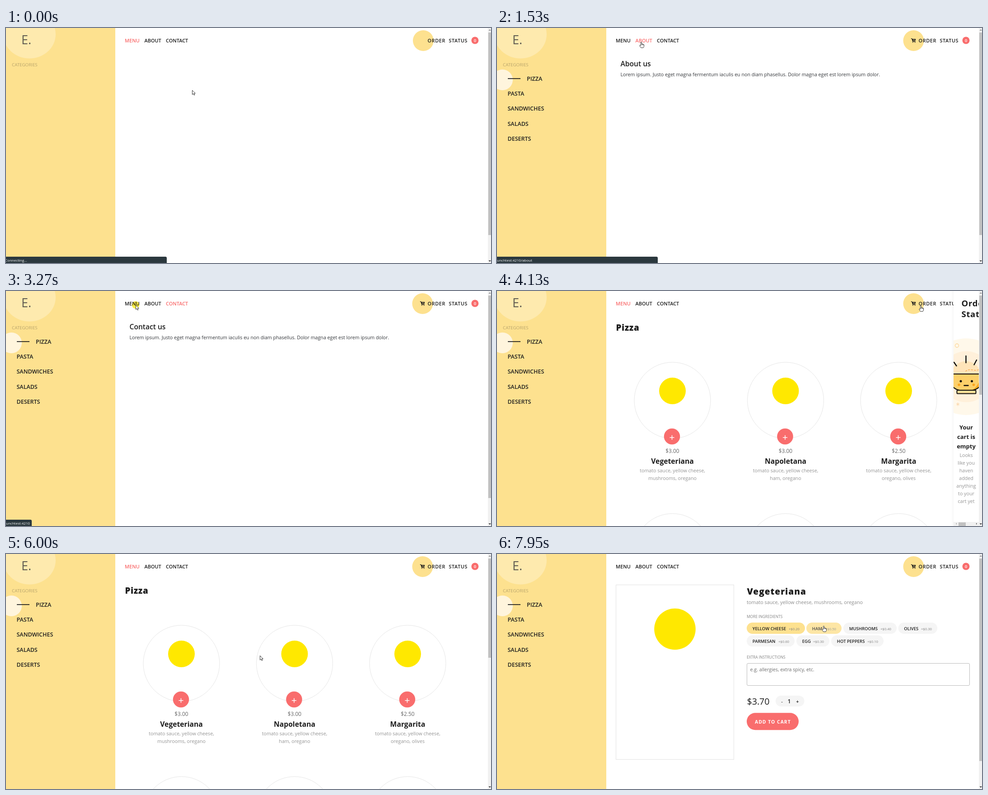
These frames come from a looping animation (1074 px wide and 521 px high, 8000 ms). An HTML page:

```html
<!DOCTYPE html>
<html lang="en">
<head>
<meta charset="utf-8">
<title>Food order</title>
<style>
html, body { margin: 0; width: 100%; height: 100%; overflow: hidden; background: #fff; }
body, text { font-family: "Open Sans", "Noto Sans", sans-serif; }
#stage { position: relative; width: 1074px; height: 521px; overflow: hidden; }
#stage > svg { position: absolute; left: 0; top: 0; display: block; }
text { white-space: pre; }
#drawer { position: absolute; right: 7px; top: 0; height: 521px; overflow: hidden; background: #fff;
  box-shadow: -1px 0 6px rgba(0,0,0,.06); color: #1d1d1d; }
.head { display: flex; justify-content: space-between; padding: 15px 17.5px 0; margin-bottom: 42px; }
.head h2 { margin: 0; font-size: 18.5px; line-height: 24px; font-weight: 700; letter-spacing: .7px; }
.hide { flex: none; position: relative; top: 2.5px; display: flex; align-items: center; height: 24px;
  font-size: 10.8px; font-weight: 500; letter-spacing: .9px; }
.hide svg { margin-left: 7px; }
.art { display: block; position: relative; left: 50%; margin-left: -85px; }
.note { padding: 17px 7.2% 0; text-align: center; }
.note b { display: block; font-size: 13px; line-height: 21.2px; font-weight: 700; }
.note span { display: block; font-size: 10.7px; line-height: 17px; color: #959595; }
#hbar { position: absolute; left: 0; right: 0; bottom: 0; height: 9px; background: #f1f1f1; }
#hbar i { position: absolute; left: 11px; top: 1px; width: 16px; height: 8px; background: #c1c1c1; }
#hbar::before, #hbar::after { content: ""; position: absolute; top: 2px; border: 2.5px solid transparent; }
#hbar::before { left: 3px; border-right-color: #a0a0a0; }
#hbar::after { right: 2px; border-left-color: #505050; }
</style>
</head>
<body>
<div id="stage">
  <svg id="page" width="1074" height="521"></svg>
  <div id="drawer">
    <div class="head">
      <h2>Order Status</h2>
      <div class="hide">HIDE<svg width="15" height="8" fill="none" stroke="#1d1d1d"><path d="M0 4H14M11 1.5L14 4L11 6.5"/></svg></div>
    </div>
    <svg class="art" id="art" width="170" height="170" viewBox="859.5 81 170 170"></svg>
    <div class="note"><b>Your cart is empty</b><span>Looks like you haven added anything to your cart yet</span></div>
    <div id="hbar"><i></i></div>
  </div>
  <svg id="top" width="1074" height="521"></svg>
</div>
<script>
const LOOP = 8000, INK = '#1d1d1d', RED = '#f96d6d', SUN = '#fde18f', GREY = '#959595', LOGO = '#ffe800';
const SEMI = 'font-weight="600"', BOLD = 'font-weight="700"', BLACK = 'font-weight="800"';
const $ = id => document.getElementById(id);

const text = (x, y, size, str, attrs = '') => `<text x="${x}" y="${y}" font-size="${size}" fill="${INK}" ${attrs}>${str}</text>`;
const dot = (x, y, r, fill, attrs = '') => `<circle cx="${x}" cy="${y}" r="${r}" fill="${fill}" ${attrs}/>`;
const box = (x, y, w, h, r, fill, attrs = '') => `<rect x="${x}" y="${y}" width="${w}" height="${h}" rx="${r}" fill="${fill}" ${attrs}/>`;
const path = (d, attrs) => `<path d="${d}" ${attrs}/>`;
const group = (id, body) => `<g id="${id}">${body}</g>`;
const tint = c => `style="fill:${c}"`;
const mid = c => `text-anchor="middle" ${tint(c)}`;

function sidebar() {
  const items = ['PASTA', 'SANDWICHES', 'SALADS', 'DESERTS'];
  return box(0, 0, 242, 521, 0, SUN) +
    '<ellipse cx="52" cy="14" rx="58" ry="53.5" fill="#fff" opacity=".28"/>' +
    text(34, 36, 27, 'E.', tint('#5f5b51') + ' font-weight="500"') +
    text(13, 85, 9.75, 'CATEGORIES', tint('#b8a46c')) +
    group('cats', dot(12, 115, 23, '#fff5dd') + box(24, 111.3, 28, 1.8, 0, INK) +
      text(66, 117.3, 12.5, 'PIZZA', SEMI) +
      items.map((s, i) => text(23.5, 150.1 + i * 33.25, 12.5, s, SEMI)).join(''));
}

function navbar() {
  const link = (id, x, s) => text(x, 32, 10.9, s, `id="${id}" ${SEMI}`);
  const cart = path('M916.8 23.6h2.2l1.6 6h6', `fill="none" stroke="${INK}" stroke-width="1.1"`) +
    path('M919.2 24.2h8.2l-1.2 4.4h-6z', `fill="${INK}"`) +
    path('M923.3 25v2.8M921.9 26.4h2.8', `stroke="${SUN}" stroke-width=".8"`) +
    dot(921, 31.4, 1, INK) + dot(925.6, 31.4, 1, INK);
  return link('menu', 263, 'MENU') + link('about', 306.5, 'ABOUT') + link('contact', 354, 'CONTACT') +
    dot(922.5, 28, 23, SUN, 'id="sun"') + group('cart', cart) +
    text(933.5, 32, 10.9, 'ORDER', 'letter-spacing=".6" ' + SEMI) +
    text(980.5, 32, 10.9, 'STATUS', 'letter-spacing=".6" ' + SEMI) +
    dot(1038.5, 27.5, 8, RED) + text(1038.5, 30.8, 9, '0', mid('#fff') + SEMI);
}

function products() {
  const list = [
    [388.5, '$3.00', 'Vegeteriana', 'mushrooms, oregano'],
    [639, '$3.00', 'Napoletana', 'ham, oregano'],
    [889.5, '$2.50', 'Margarita', 'oregano, olives']
  ];
  return list.map(([x, price, name, rest], i) => {
    const ring = y => dot(x, y, 84.5, 'none', 'stroke="#e6e6e6"');
    const add = dot(x - 1, 322.5, 17.8, RED) + path(`M${x - 6} 324.7h10M${x - 1} 319.7v10`, 'stroke="#fff" stroke-width="1.5"');
    return ring(242.5) + ring(578) + dot(x, 221.5, 29.5, LOGO, 'class="pic"') + group('add' + i, add) +
      text(x, 358.5, 11.9, price, mid('#666')) +
      text(x, 382.5, 15.7, name, mid(INK) + BOLD) +
      text(x, 402, 10.7, 'tomato sauce, yellow cheese,', mid(GREY)) +
      text(x, 419, 10.7, rest, mid(GREY));
  }).join('');
}

function infoPage() {
  return text(273.5, 85, 15.6, '', 'id="infoTitle" ' + SEMI) +
    text(273.5, 107, 10.67, 'Lorem ipsum. Justo eget magna fermentum iaculis eu non diam phasellus. Dolor magna eget est lorem ipsum dolor.', tint('#33363a'));
}

function detail() {
  const chips = [
    [553, 129, 0, 'YELLOW CHEESE', '20'], [685, 78, 0, 'HAM', '50'], [767, 118, 0, 'MUSHROOMS', '40'], [888.5, 86.5, 0, 'OLIVES', '30'],
    [553, 106, 1, 'PARMESAN', '60'], [663, 73, 1, 'EGG', '30'], [740, 116, 1, 'HOT PEPPERS', '10']
  ];
  const chip = ([x, w, row, name, cents], i) => {
    const y = 152 + row * 28.3;
    return group('chip' + i, box(x, y, w, 25, 12.5, '#f5f5f5') + text(x + 12.8, y + 16.8, 9.5, name, SEMI) +
      text(x + w - 12, y + 16.5, 7.7, '+$0.' + cents, 'text-anchor="end" ' + tint('#808080')));
  };
  return box(263.5, 68.5, 261, 387, 0, '#fff', 'stroke="#e2e2e2"') + dot(394, 166.5, 45.8, LOGO) +
    text(553.5, 90, 19.1, 'Vegeteriana', 'letter-spacing="1" ' + BLACK) +
    text(553, 110.8, 10.8, 'tomato sauce, yellow cheese, mushrooms, oregano', tint('#8c8c8c') + ' font-weight="500"') +
    text(553, 142, 8.4, 'MORE INGREDIENTS', tint('#828282')) + chips.map(chip).join('') +
    text(553, 232, 8.4, 'EXTRA INSTRUCTIONS', tint('#828282')) +
    box(553.5, 242.5, 493, 49, 2.5, '#fff', 'stroke="#bababa"') +
    text(560.5, 260, 10.67, 'e.g. allergies, extra spicy, etc.', tint('#6c6c6c')) +
    text(553.5, 334, 19.6, '', 'id="price"') +
    box(617, 314, 63.5, 24, 12, '#f5f5f5') + text(631, 331, 11, '-', mid(INK)) +
    text(647, 331.3, 12.5, '1', mid(INK) + SEMI) + text(665.3, 331, 11, '+', mid(INK) + SEMI) +
    box(553, 352.3, 115, 38, 19, RED) +
    text(571, 375.8, 10.4, 'ADD TO CART', tint('#fff') + 'letter-spacing="1" ' + BOLD);
}

function emptyBowl() {
  const line = (d, w = 2.4) => path(d, `fill="none" stroke="#0c0c0c" stroke-width="${w}" stroke-linecap="round"`);
  const plus = (x, y) => path(`M${x - 4.5} ${y}h9M${x} ${y - 4.5}v9`, 'stroke="#fbc45a" stroke-width="1.6"');
  const star = (x, y) => path(`M${x} ${y - 4}v8M${x - 3.5} ${y - 2}l7 4M${x - 3.5} ${y + 2}l7 -4`, 'stroke="#fbd2a4"');
  const ring = (x, y) => dot(x, y, 4, 'none', 'stroke="#fcd69a" stroke-width="1.3"');
  const bowl = 'M904 160H985C985 180 973 194 958 196H930C916 194 904 180 904 160Z';
  return dot(944.5, 166, 85, '#fff8ea') + dot(944.5, 166, 56.5, '#fff0da') + dot(944, 164.5, 33, '#fee4b9') +
    ring(924, 97) + ring(879, 173) + ring(1001, 173) +
    plus(980, 94) + plus(898, 144) + plus(997, 225) + star(1014, 141) + star(926, 227) +
    path(bowl, 'fill="#fcd06a"') +
    path('M976 160H985C985 180 973 193 959 195C971 186 976 174 976 160Z', 'fill="#fbaa1f"') +
    line(bowl, 2) +
    box(924, 196, 42, 7.5, 1, '#fddf98', 'stroke="#0c0c0c" stroke-width="2"') +
    line('M944 120V135M917.5 134L923 142M967.5 129L962 139.5') +
    path('M943 154Q949 149 959 151T976 149Q979 145 977 142', 'fill="none" stroke="#fba94a" stroke-width="1.5" stroke-dasharray="4 2.5"') +
    line('M978.5 135l6 6M979 139.5l5.5 -4M982 134.5l3 1M980 138l2 3', 1.4) + dot(982, 138, 2.3, '#222') +
    dot(932.5, 176, 2.5, '#0c0c0c') + dot(957, 176, 2.5, '#0c0c0c') +
    dot(928.5, 184, 2.8, '#fba41c') + dot(961, 184, 2.8, '#fba41c') + line('M940 185.5H949');
}

function overlay() {
  const outline = 'fill="#fff" stroke="#222" stroke-width=".9" stroke-linejoin="round"';
  return box(1067, 0, 7, 521, 0, '#f1f1f1') + box(1068, 10, 6, 449, 0, '#c1c1c1', 'id="thumb"') +
    path('M1068.5 6l2.7-3.5L1074 6z', 'fill="#a0a0a0"') + path('M1068.5 515l2.7 3.5L1074 515z', 'fill="#505050"') +
    group('status', box(-5, 507, 361, 18, 3, '#2b383e', 'id="bar"') + text(-2, 517.5, 8, '', `id="barText" ${tint('#fff')}`)) +
    group('pointer', dot(0, 0, 8.3, '#fff04a', 'id="glow" style="mix-blend-mode:multiply"') +
      group('arrow', path('M.5 .5V10L2.8 8L4.4 11.4L5.9 10.8L4.4 7.4H7.3Z', outline)) +
      group('hand', path('M-.6 7.5V1.2Q.5 -.2 1.6 1.2V5Q3 4.2 3.6 5.3Q5 4.9 5.3 6Q6.4 5.8 6.5 7V10Q6 12 5 13.3H-.2Q-2.6 10.4 -3.2 8.2Q-2.6 6.4 -.6 8.4ZM1.6 5V7.3M3.6 5.3V7.4M5.3 6V7.6', outline)) +
      group('beam', path('M-3 -6H-.7L0 -5.2L.7 -6H3M0 -5.2V5.2M-3 6H-.7L0 5.2L.7 6H3', 'fill="none" stroke="#333"')));
}

$('page').innerHTML = sidebar() + navbar() +
  text(263.5, 88.3, 18.8, 'Pizza', 'id="homeTitle" letter-spacing=".6" ' + BLACK) +
  group('home', products()) + group('info', infoPage()) + group('detail', detail());
$('art').innerHTML = emptyBowl();
$('top').innerHTML = overlay();

// Timed states: [ms, ...values]
const HOST = 'lunchtest:4210';
const views = [[0, 'blank'], [140, 'title'], [280, 'home'], [1530, 'about'], [1990, 'contact'], [3410, 'home'], [6740, 'detail']];
const bars = [
  [0, 'Connecting...', 356, 1], [340, 'Connecting...', 356, .6], [410, 'Connecting...', 356, .3], [480, '', 0, 0],
  [1270, HOST + '/about', 82, 1], [1530, HOST + '/about', 356, 1],
  [1800, HOST + '/contact', 87, 1], [2070, HOST + '/contact', 356, 1],
  [2800, HOST, 57, 1], [3410, HOST, 356, 1], [3730, HOST, 356, .5], [3800, '', 0, 0]
];
const drawer = [[0, 0], [4060, 8], [4130, 56], [4200, 172], [4270, 247], [5600, 239], [5670, 160], [5740, 50], [5800, 0]];
const clicks = [[1340, 1530], [1800, 1990], [3140, 3410], [3860, 4060], [5410, 5600], [6520, 6740], [7210, 7480], [7770, 7950]];

// Pointer, in ticks of 1/15 s: [tick, x, y, easing into this point]
const smooth = u => u * u * (3 - 2 * u), slowIn = u => u ** 1.5, slowOut = u => 1 - (1 - u) ** 1.6;
const track = [
  [0, 412, 137.5], [11, 412, 137.5], [19, 319, 30.5], [25, 319, 30.5], [27, 374, 28], [36, 374, 28], [43, 287, 31],
  [53, 287, 31], [58, 938, 32], [68, 938, 32], [72, 960, 297], [73, 965, 274], [77, 1016, 31], [84, 1016, 31],
  [90, 562, 225, slowIn], [94, 385, 321, slowOut], [105, 385, 321], [108, 650, 164], [111, 650, 164], [116, 723, 159]
];
const shapes = [
  [0, 'arrow'], [18, 'hand'], [26, 'arrow'], [27, 'hand'], [38, 'arrow'], [42, 'hand'], [49, 'arrow'], [51, 'hand'],
  [54, 'arrow'], [58, 'hand'], [64, 'beam'], [70, 'arrow'], [73, 'beam'], [74, 'arrow'], [77, 'hand'], [85, 'arrow'],
  [94, 'hand'], [101, 'arrow'], [108, 'hand']
];

const at = (table, t) => table.findLast(row => row[0] <= t);
const show = (id, on) => { $(id).style.display = on ? '' : 'none'; };
const within = (t, a, b) => t >= a && t < b;

function pointerAt(tick) {
  const i = track.findIndex(p => p[0] > tick);
  if (i < 0) return track[track.length - 1].slice(1, 3);
  const a = track[i - 1], b = track[i], u = (b[3] || smooth)((tick - a[0]) / (b[0] - a[0]));
  return [a[1] + (b[1] - a[1]) * u, a[2] + (b[2] - a[2]) * u];
}

function render(t) {
  const view = at(views, t)[1], isHome = view === 'home', isInfo = view === 'about' || view === 'contact';
  const active = isInfo ? view : view === 'detail' ? '' : 'menu';
  for (const id of ['menu', 'about', 'contact']) $(id).style.fill = id === active ? RED : INK;

  show('cats', t >= 80);
  show('cart', t >= 80);
  $('sun').setAttribute('cx', t < 80 ? 924 : 922.5);
  show('homeTitle', isHome || view === 'title');
  show('home', isHome);
  show('info', isInfo);
  show('detail', view === 'detail');
  $('infoTitle').textContent = view === 'about' ? 'About us' : 'Contact us';
  document.querySelectorAll('.pic').forEach(p => { p.style.opacity = t < 340 ? 0 : 1; });
  $('add0').style.opacity = within(t, 6260, 6740) ? .8 : 1;
  $('thumb').setAttribute('height', isHome ? 220 : 449);

  $('price').textContent = t < 7480 ? '$3.00' : t < 7950 ? '$3.20' : '$3.70';
  $('chip0').firstChild.style.fill = t >= 7480 ? SUN : '';
  $('chip1').firstChild.style.fill = t >= 7950 ? SUN : '';
  $('chip0').style.opacity = within(t, 7210, 7600) ? .8 : 1;
  $('chip1').style.opacity = t >= 7700 ? .8 : 1;

  const width = at(drawer, t)[1];
  show('drawer', width > 0);
  $('drawer').style.width = width + 'px';
  show('hbar', width < 170);

  const [, label, barWidth, alpha] = at(bars, t);
  $('status').style.opacity = alpha;
  $('bar').setAttribute('width', barWidth + 5);
  $('barText').textContent = label;

  const tick = Math.floor((t + 14) * .015), [x, y] = pointerAt(tick), shape = at(shapes, tick)[1];
  $('pointer').setAttribute('transform', `translate(${x} ${y})`);
  for (const id of ['arrow', 'hand', 'beam']) show(id, id === shape);
  show('glow', clicks.some(([a, b]) => within(t, a, b)));
}

const start = performance.now();
function loop() {
  render((performance.now() - start) % LOOP);
  requestAnimationFrame(loop);
}
loop();
</script>
</body>
</html>
```
